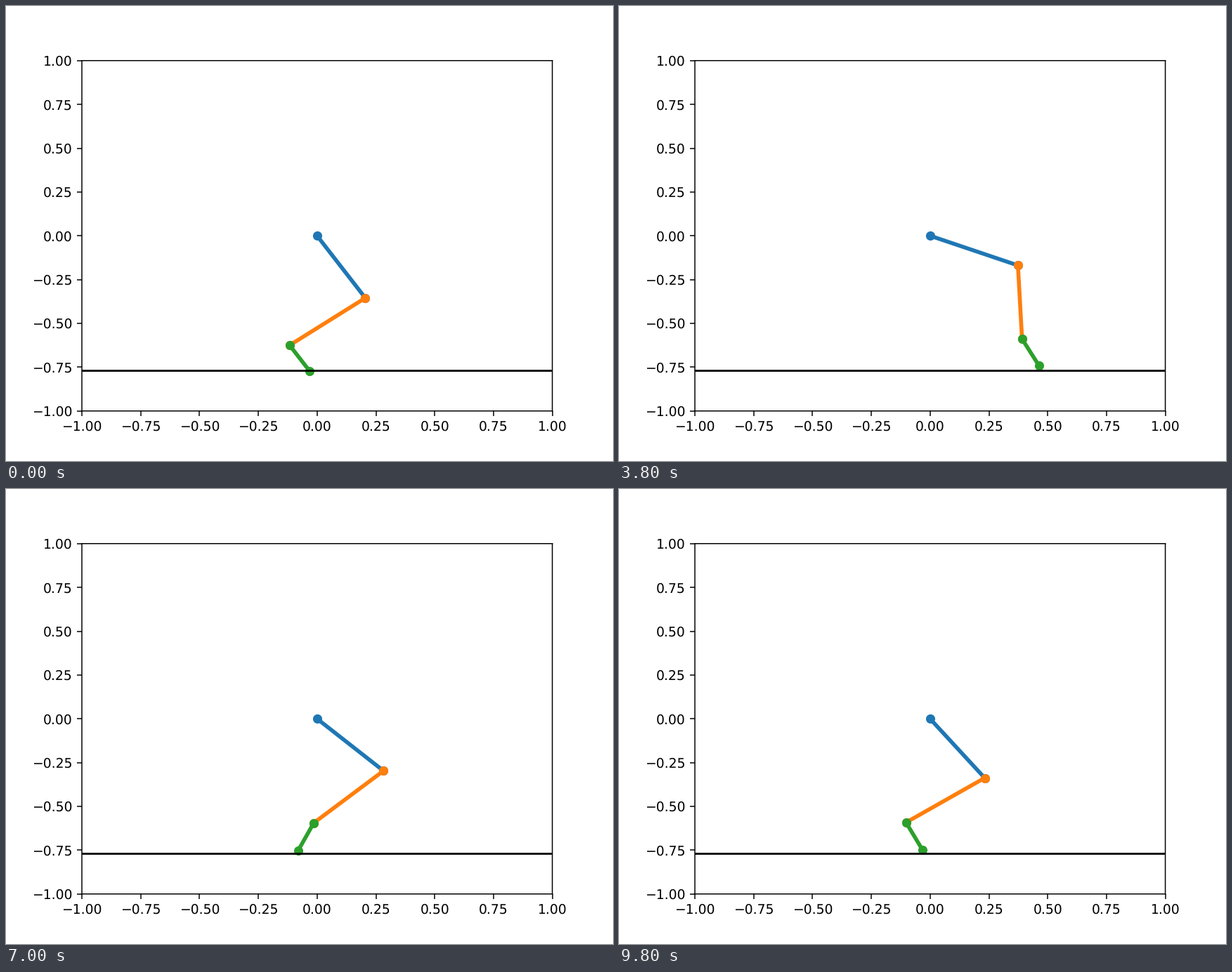
Animation, 864 px wide and 648 px high, one loop 10 s. Source, as a matplotlib script:

```python
import matplotlib.pyplot as plt
import numpy as np
from matplotlib.animation import FuncAnimation

FRAMES, INTERVAL = 50, 200
THIGH, SHANK, FOOT = 0.41, 0.42, 0.17
GROUND = -0.7706

# Soft, unsnapped edges
plt.rcParams.update({"path.snap": False, "text.hinting": "none"})


def ease(t, start, end):
    """Cosine ramp from 0 to 1 between two steps."""
    x = np.clip((t - start) / (end - start), 0, 1)
    return (1 - np.cos(np.pi * x)) / 2


def hip_angle(t):
    swing = 33.5 * ease(t, 1.5, 13.5)
    landing = -7.7 * ease(t, 15, 23)
    push = -42.6 * ease(t, 25, 47)
    lift = 15.3 * ease(t, 40, 49)
    return 30 + swing + 6 * (t >= 8) + landing + push + lift


def knee_angle(t):
    stretch = -25.9 * ease(t, 11.5, 19)
    bend = 25.5 * ease(t, 18, 33) - 1.2 * ease(t, 34, 42)
    return 80 + 8.9 * (t >= 8) + stretch + bend


def ankle_angle(t):
    curl = 84.5 * ease(t, 1, 8) - 142.4 * ease(t, 7.2, 19.6)
    return 80 + curl + 54.8 * ease(t, 43, 49)


def joints(t):
    """Hip, knee, ankle and toe; link angles are measured from straight down."""
    thigh = hip_angle(t)
    shank = thigh - knee_angle(t)
    foot = shank + ankle_angle(t)
    points = [(0, 0)]
    for length, angle in zip((THIGH, SHANK, FOOT), np.radians((thigh, shank, foot))):
        x, y = points[-1]
        points.append((x + length * np.sin(angle), y - length * np.cos(angle)))
    return np.transpose(points)


fig, ax = plt.subplots(figsize=(6.4, 4.8), dpi=135)
ax.set_xlim(-1, 1)
ax.set_ylim(-1, 1)
links = [ax.plot([], [], "o-", lw=3)[0] for _ in range(3)]
ax.axhline(GROUND, color="black", lw=1.5)


def draw(i):
    x, y = joints(max(i, 1))
    for j, link in enumerate(links):
        link.set_data(x[j:j + 2], y[j:j + 2])
    return links


anim = FuncAnimation(fig, draw, frames=FRAMES, interval=INTERVAL,
                     repeat=True, repeat_delay=0)
plt.show()
```
